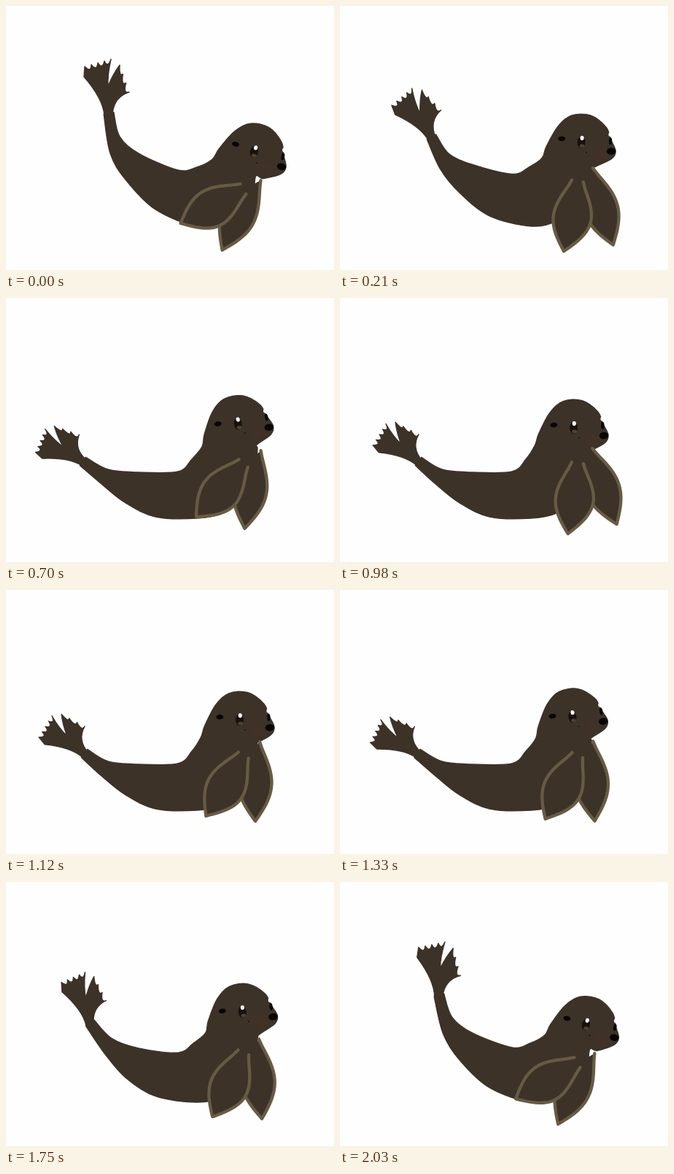
An HTML page with a canvas that plays this animation: 450 by 362 pixels, repeating every 2100 ms.

```html
<!DOCTYPE html>
<html lang="en">
<head>
<meta charset="utf-8">
<title>Seal</title>
<style>
html, body { margin: 0; width: 100%; height: 100%; overflow: hidden; background: #fefefe; }
canvas { display: block; }
</style>
</head>
<body>
<canvas id="stage" width="450" height="362"></canvas>
<script>
const ctx = document.getElementById('stage').getContext('2d');
const LOOP = 2100, STEP = 70, FLAP = 420, SETTLE = 500;
const PAPER = '#fefefe', SKIN = '#3c3228', RIM = '#675b43', INK = '#080606';
const { sin, cos, atan2, hypot, PI, min, max } = Math;
const RAD = PI / 180;

// Nape, crown, brow, snout and throat, measured from the ear
const HEAD = [[-27, 27], [-21, 11], [-5, -17], [14, -32], [40, -32], [61, -16], [67, 0], [74, 16], [69, 27], [47, 38]];

// All motion follows from the time alone
function poseAt(t) {
  const u = min(t, LOOP - t);
  const flick = t > 1500 ? sin(PI * (t - 1500) / 600) : 0;
  return {
    lift: max(0, 1 - u / SETTLE),
    rest: max(0, (u - SETTLE) / (LOOP / 2 - SETTLE)),
    flick,
    flap: cos(2 * PI * (t - 175) / FLAP),
    lean: sin(2 * PI * t / LOOP)
  };
}

function place(points, x, y, deg) {
  const c = cos(deg * RAD), s = sin(deg * RAD);
  return points.map(([px, py]) => [x + px * c - py * s, y + px * s + py * c]);
}

// Smooth open curve through the points
function curve(pts) {
  ctx.moveTo(...pts[0]);
  for (let i = 0; i < pts.length - 1; i++) {
    const a = pts[i], b = pts[i + 1], p = pts[i - 1] || a, n = pts[i + 2] || b;
    ctx.bezierCurveTo(a[0] + (b[0] - p[0]) / 6, a[1] + (b[1] - p[1]) / 6,
      b[0] - (n[0] - a[0]) / 6, b[1] - (n[1] - a[1]) / 6, b[0], b[1]);
  }
}

function fillSkin() {
  ctx.closePath();
  ctx.fillStyle = ctx.strokeStyle = SKIN;
  ctx.lineWidth = 1.4;
  ctx.fill();
  ctx.stroke();
}

function blob(x, y, rx, ry, color) {
  ctx.fillStyle = color;
  ctx.beginPath();
  ctx.ellipse(x, y, rx, ry, 0, 0, 2 * PI);
  ctx.fill();
}

// One edge of a leaf-shaped flipper, from root to tip
function edge(width, top, tip, from = 0) {
  const pts = [];
  for (let i = 0; i <= 12; i++) {
    const k = from + (1 - from) * i / 12;
    pts.push([width * sin(PI * (0.1 + 0.9 * k ** 1.2)), top + (tip - top) * k]);
  }
  return pts;
}

function flipper(x, y, deg, back, front, top, from) {
  const rear = place(edge(-back, top, 98, from), x, y, deg);
  const fore = place(edge(front, top, 98), x, y, deg);
  ctx.beginPath();
  [...rear, ...fore.slice().reverse()].forEach(p => ctx.lineTo(...p));
  ctx.fillStyle = SKIN;
  ctx.fill();
  ctx.strokeStyle = RIM;
  ctx.lineWidth = 4.3;
  ctx.beginPath();
  curve(rear);
  curve(fore);
  ctx.stroke();
}

// Webbed edge: equal toes with hollows pulled towards the root
function scallops(x0, y0, x1, y1, count) {
  const dx = (x1 - x0) / count, dy = (y1 - y0) / count;
  for (let i = 0; i < count; i++) {
    const mx = x0 + dx * (i + 0.5), my = y0 + dy * (i + 0.5), pull = 1 - 11 / hypot(mx, my);
    ctx.quadraticCurveTo(mx * pull, my * pull, x0 + dx * (i + 1), y0 + dy * (i + 1));
  }
}

function fluke(x, y, deg, size) {
  ctx.save();
  ctx.translate(x, y);
  ctx.rotate(deg * RAD);
  ctx.scale(size, size);
  ctx.beginPath();
  ctx.moveTo(-6, 3);
  ctx.quadraticCurveTo(-8, -20, -34, -50);
  ctx.lineTo(-33, -64);
  scallops(-33, -64, 3, -74, 4);
  ctx.quadraticCurveTo(-2, -52, -1, -37);
  ctx.quadraticCurveTo(6, -54, 15, -66);
  scallops(15, -66, 28, -29, 3);
  ctx.quadraticCurveTo(6, -22, 5, 3);
  fillSkin();
  ctx.restore();
}

function face(x, y, deg) {
  ctx.save();
  ctx.translate(x, y);
  ctx.rotate(deg * RAD);
  const blush = ctx.createRadialGradient(52, 21, 2, 52, 21, 16);
  blush.addColorStop(0, 'rgba(72,48,36,.5)');
  blush.addColorStop(1, 'rgba(72,48,36,0)');
  blob(52, 21, 15, 11, blush);
  blob(0, 0, 5, 3.3, INK);
  blob(27, 5, 5.5, 8, '#17110e');
  blob(28, 10, 3.5, 2.5, '#50402f');
  blob(28, -1, 2.6, 3.1, '#fff');
  blob(34, 19, 1.2, 1, '#211813');
  blob(67, 3, 2.2, 5, INK);
  blob(66, -6, 1.7, 2.8, PAPER);
  blob(68, 17, 6.3, 4.7, INK);
  ctx.restore();
}

function draw(t) {
  const { lift, rest, flick, flap, lean } = poseAt(t);
  const ear = [289 + 26 * lift + 5 * rest, 171.5 + 18 * lift + 3 * rest];
  const tilt = -16 + 28 * lift + 16 * rest;
  const joint = [104 + 37 * lift + 4 * rest, 224 - 77 * lift - 8 * flick];
  const back = [140 + 16 * lift, 235 - 56 * lift - 4 * flick];
  const belly = [131 + 12 * lift, 255 - 53 * lift - 5 * flick];
  const far = [341 + 3 * flap, 219 + 27 * lift];

  // Half width of the tail where the fluke joins
  const dir = atan2(back[1] + belly[1] - 2 * joint[1], back[0] + belly[0] - 2 * joint[0]);
  const wx = 7 * sin(dir), wy = 7 * cos(dir);

  ctx.fillStyle = PAPER;
  ctx.fillRect(0, 0, 450, 362);
  ctx.lineCap = ctx.lineJoin = 'round';

  ctx.beginPath();
  curve([
    [joint[0] + wx, joint[1] - wy], back, [182, 239 - 37 * lift], [236, 238 - 13 * lift], [255 + 7 * lift, 221],
    ...place(HEAD, ...ear, tilt),
    [far[0] + 4, far[1] - 12], [far[0], far[1] + 20], [322, 272],
    [299, 294], [262, 302], [205, 300 - 21 * lift], [164, 281 - 43 * lift], belly,
    [joint[0] - wx, joint[1] + wy]
  ]);
  fillSkin();
  fluke(...joint, -58 * (1 - lift) + 17 * rest + 34 * flick, 0.92 + 0.08 * lift);
  face(...ear, tilt);

  flipper(...far, 1 - 28 * flap + 8 * lean, 23, 23, -11, 0.35);
  flipper(325, 226 + 24 * lift, 33 - 32 * flap + 9 * lean, 23, 29, 0, 0);
}

const start = performance.now();
function tick() {
  const t = (performance.now() - start) % LOOP;
  draw(Math.floor(t / STEP) * STEP);
  requestAnimationFrame(tick);
}
tick();
</script>
</body>
</html>
```
